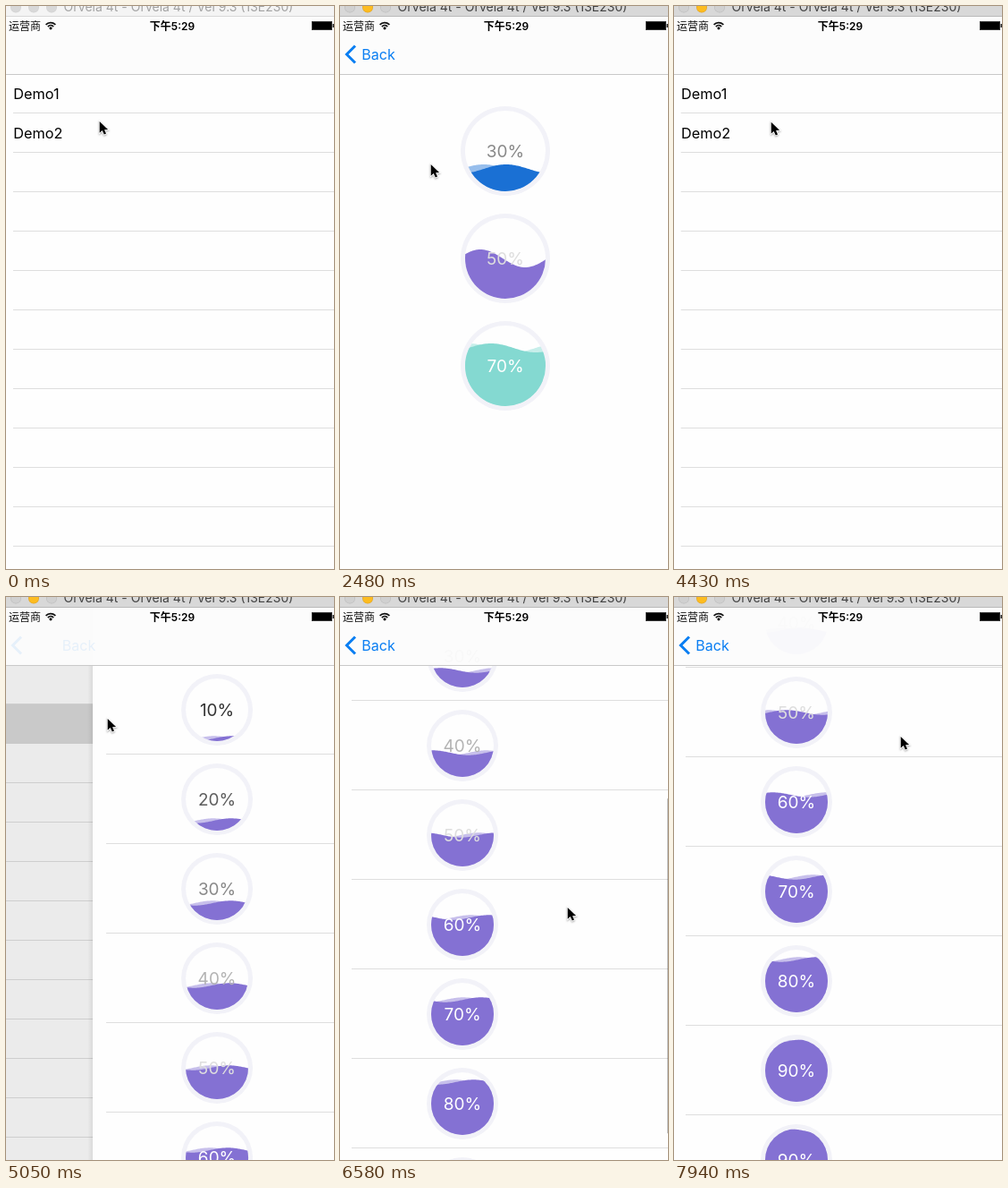
Animation, 367 px wide and 629 px high, one loop 8 s. Source, as an HTML page with a canvas:

```html
<!DOCTYPE html>
<html lang="zh">
<head>
<meta charset="utf-8">
<style>
html, body { margin: 0; width: 100%; height: 100%; overflow: hidden; background: #fefefe; }
canvas { display: block; width: 367px; height: 629px; }
</style>
</head>
<body>
<canvas id="stage" width="367" height="629"></canvas>
<script>
const ctx = document.getElementById('stage').getContext('2d');
const W = 367, H = 629, LOOP = 8, SCREEN = 375, ROW = 44, CELL = 100, NAV_LINE = 76;
const FONT = 'Inter, "Noto Sans CJK SC", "Noto Sans CJK", sans-serif';
const BLUE = '#0a7ef2', PURPLE = '#8471d3', PAPER = '#fefefe', RULE = '#dedede';
const ARROW = new Path2D('M0 0V15L3.5 11.8L6 17.2L8.6 16L6.3 10.8L11 10.6Z');

// Times in seconds
const PUSH_1 = 1.57, PRESS_BACK = 3.72, POP = 3.82, PUSH_2 = 4.86, FLICK_1 = 5.8, FLICK_2 = 6.75;

const POINTER_START = { x: 104, y: 128 };
const POINTER_MOVES = [
  { from: .09, to: .87, dx: -17, dy: -42 },
  { from: .93, to: 1.14, dx: -13, dy: 11 },
  { from: 1.75, to: 2.48, dx: 27, dy: 79 },
  { from: 2.5, to: 3.15, dx: -52, dy: -120 },
  { from: 4, to: 4.52, dx: 64, dy: 79 },
  { from: 5.2, to: 5.7, dx: 143, dy: 365 },
  { from: FLICK_1, to: 6.4, dx: -2, dy: -154 },
  { from: FLICK_2, to: 7.2, dx: -1, dy: -191 }
];

const ramp = (t, from, to) => Math.max(0, Math.min(1, (t - from) / (to - from)));

function ease(t, from, to) {
  const x = ramp(t, from, to);
  return x * x * (3 - 2 * x);
}

// Critically damped spring from 0 to 1
function spring(t) {
  if (t <= 0) return 0;
  const x = 13.7 * t, rest = (1 + x) * Math.exp(-x);
  return rest < .002 ? 1 : 1 - rest;
}

// Two flicks; the second runs past the end and bounces back
function scrollAt(t) {
  const bounce = 28 * Math.sin(Math.PI * ramp(t, 6.95, 7.85));
  return 260 * ease(t, FLICK_1, 6.58) + 137 * ease(t, FLICK_2, 7.25) + bounce;
}

function rect(x, y, w, h, color) {
  ctx.fillStyle = color;
  ctx.fillRect(x, y, w, h);
}

function text(str, x, y, size, color, align = 'left', weight = 400) {
  ctx.font = `${weight} ${size}px ${FONT}`;
  ctx.textAlign = align;
  ctx.fillStyle = color;
  ctx.fillText(str, x, y);
}

function disc(x, y, r, color) {
  ctx.beginPath();
  ctx.arc(x, y, r, 0, 2 * Math.PI);
  ctx.fillStyle = color;
  ctx.fill();
}

function wave(cx, cy, r, level, amp, crest, color, alpha) {
  ctx.beginPath();
  for (let x = cx - r; x <= cx + r; x++)
    ctx.lineTo(x, level - amp * Math.cos(Math.PI * (x - crest) / r));
  ctx.lineTo(cx + r, cy + r);
  ctx.lineTo(cx - r, cy + r);
  ctx.globalAlpha = alpha;
  ctx.fillStyle = color;
  ctx.fill();
  ctx.globalAlpha = 1;
}

// Ring gauge; the waves start half a radius right of the centre and drift left
function gauge(cx, cy, r, tenths, amp, drift, color, twoWaves = true) {
  const level = cy + (.5 - tenths / 10) * 2 * r, crest = cx + r / 2 - drift;
  ctx.save();
  disc(cx, cy, r, '#f2f2f8');
  disc(cx, cy, r - 5, PAPER);
  ctx.clip();
  if (twoWaves) wave(cx, cy, r, level, amp, crest - r / 2, color, .45);
  wave(cx, cy, r, level, amp, crest, color, 1);
  ctx.restore();
  const grey = Math.min(255, 7 + 43 * tenths);
  text(tenths * 10 + '%', cx, cy + 7, 19, `rgb(${grey},${grey},${grey})`, 'center');
}

function drawMenu(offset, selected, strength) {
  ctx.save();
  ctx.translate(offset, 0);
  rect(0, 0, W - offset, H, PAPER);
  for (let y = NAV_LINE + ROW - 1; y < H; y += ROW) rect(8, y, W - offset, 1, RULE);
  ctx.globalAlpha = strength;
  rect(0, NAV_LINE + ROW * selected, W - offset, ROW, '#d9d9d9');
  ctx.globalAlpha = 1;
  [1, 2].forEach(n => text('Demo' + n, 8.3, NAV_LINE + ROW * n - 16.5, 16.3, '#000'));
  ctx.restore();
}

function drawGauges(age) {
  gauge(185, 162, 50, 3, 5, 26.5 * age, '#1a70d4');
  gauge(185, 282, 50, 5, 10, 58 * age, '#8671d3', false);
  gauge(185, 402, 50, 7, 5, 45 * age, '#84d9d1');
}

function drawTable(t) {
  const scroll = scrollAt(t), age = t - PUSH_2;
  for (let n = 1; n <= 10; n++) {
    const y = 26 + CELL * n - scroll;
    gauge(137, y, 40, Math.min(n, 9), 2.7, (11 + 5 * n) * age, PURPLE);
    rect(13, y + 49, SCREEN, 1, RULE);
  }
  const bar = ramp(t, FLICK_1, 5.92) * (1 - ramp(t, 7.7, 7.9));
  rect(366, 77 + scroll * .57, 1, 374, `rgba(0,0,0,${.25 * bar})`);
}

function drawDetail(shown, paint) {
  rect(0, 0, W, H, `rgba(0,0,0,${.1 * shown})`);
  ctx.save();
  ctx.translate(SCREEN * (1 - shown), 0);
  const shade = ctx.createLinearGradient(-8, 0, -2, 0);
  shade.addColorStop(0, 'rgba(0,0,0,0)');
  shade.addColorStop(1, 'rgba(0,0,0,.07)');
  rect(-8, 0, 6, H, shade);
  rect(-2, 0, SCREEN, H, PAPER);
  paint();
  ctx.restore();
}

function drawNavigation(shown, pressed) {
  rect(0, 12, W, NAV_LINE - 12, 'rgba(252,252,252,.97)');
  rect(0, NAV_LINE, W, 1, '#c9c9c9');
  const alpha = shown ** 8;
  ctx.globalAlpha = alpha * (pressed ? .25 : 1);
  ctx.strokeStyle = BLUE;
  ctx.lineWidth = 3;
  ctx.stroke(new Path2D('M17 44.5L7.5 54L17 63.5'));
  ctx.globalAlpha = alpha;
  text('Back', 24.3 + 146 * (1 - shown), 60, 16, BLUE);
  ctx.globalAlpha = 1;
}

function drawStatus() {
  text('运营商', 3, 26.5, 12, '#111');
  ctx.strokeStyle = '#111';
  ctx.lineWidth = 1.7;
  for (const r of [4.3, 7.4]) {
    ctx.beginPath();
    ctx.arc(50, 26, r, -Math.PI * .76, -Math.PI * .24);
    ctx.stroke();
  }
  disc(50, 24.8, 1.6, '#111');
  text('下午5:29', 186, 26.5, 12, '#000', 'center', 600);
  ctx.lineWidth = 1;
  ctx.strokeStyle = '#333';
  ctx.strokeRect(342.5, 17.5, 22, 9);
  rect(343, 18, 21, 8, '#000');
  rect(365.5, 20, 1.5, 4, '#222');
}

function drawTitle(active) {
  rect(0, 0, W, 11, active ? '#d8d8d8' : '#f4f4f4');
  rect(0, 11, W, 1, active ? '#b9b9b9' : '#d8d8d8');
  for (let i = 0; i < 3; i++) {
    const lit = active && i === 1;
    disc(11 + 20 * i, 1.5, 6, lit ? '#e0a52a' : active ? '#bebebe' : '#d2d2d2');
    disc(11 + 20 * i, 1.5, 5.3, lit ? '#fdbc20' : active ? '#d0d0d0' : '#d8d8d8');
  }
  text('Orvela 4t - Orvela 4t / Vel 9.3 (13E230)', 193, 6, 14, active ? '#424242' : '#a2a2a2', 'center');
}

function drawPointer(t) {
  let { x, y } = POINTER_START;
  for (const { from, to, dx, dy } of POINTER_MOVES) {
    const f = ease(t, from, to);
    x += dx * f;
    y += dy * f;
  }
  ctx.save();
  ctx.translate(x + .7, y + 1);
  ctx.scale(.85, .85);
  ctx.shadowColor = 'rgba(0,0,0,.35)';
  ctx.shadowBlur = 2;
  ctx.shadowOffsetY = 1;
  ctx.lineWidth = 2;
  ctx.strokeStyle = '#fff';
  ctx.stroke(ARROW);
  ctx.shadowColor = 'transparent';
  ctx.fillStyle = '#000';
  ctx.fill(ARROW);
  ctx.restore();
}

function draw(t) {
  const second = t >= PUSH_2;
  const shown = second ? spring(t - PUSH_2) : spring(t - PUSH_1) - spring(t - POP);
  const highlight = second ? 1 : t < PUSH_1 ? 0 : 1 - ramp(t, POP, POP + .25);
  drawMenu(-110 * shown, second ? 1 : 0, highlight);
  if (shown > 0) drawDetail(shown, () => second ? drawTable(t) : drawGauges(t - PUSH_1));
  drawNavigation(shown, t > PRESS_BACK && !second);
  drawStatus();
  drawTitle(t >= PUSH_1);
  drawPointer(t);
}

function tick() {
  draw(performance.now() / 1000 % LOOP);
  requestAnimationFrame(tick);
}
tick();
</script>
</body>
</html>
```
